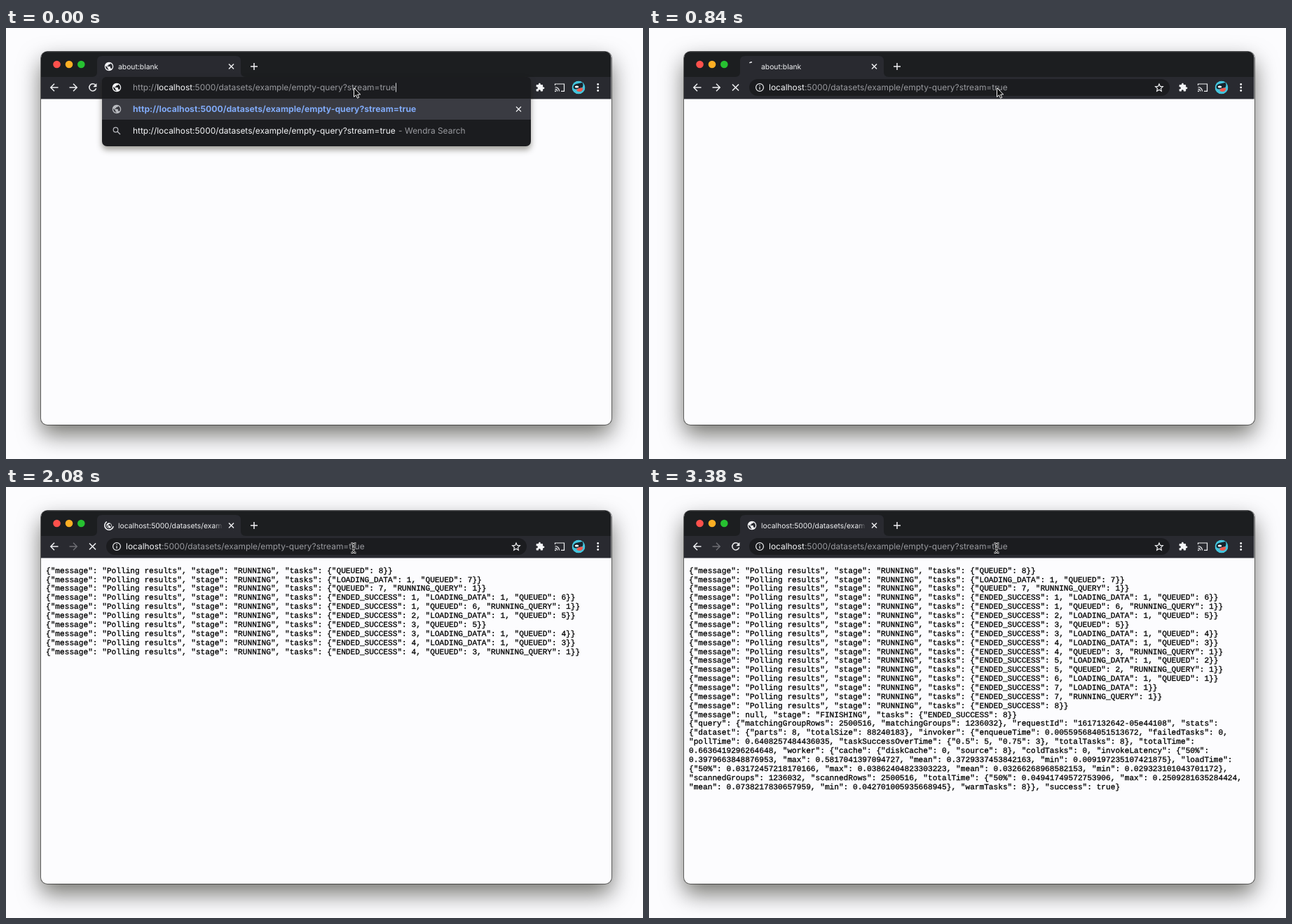
Animation of 909 by 616 pixels, one loop 3400 ms. Source, as an HTML page:

```html
<!DOCTYPE html>
<html lang="en">
<head>
<meta charset="utf-8">
<title>Streaming query</title>
<style>
  html, body { margin: 0; width: 100%; height: 100%; overflow: hidden; background: #fcfcfe; }
  .window {
    position: absolute; left: 50px; top: 33.5px; width: 813.5px; height: 533.5px; border-radius: 9px;
    background: #fcfcfe;
    box-shadow: 0 0 0 1px rgba(0, 0, 0, .5), 0 14px 32px rgba(10, 10, 0, .57);
  }
  svg { position: absolute; left: 0; top: 0; display: block; }
  text {
    font: 11.93px Inter, sans-serif; fill: #999a9f; white-space: pre;
    text-rendering: geometricPrecision;
  }
  .white { fill: #f4f5f7; }
  .tab { font-size: 10.35px; fill: #f0f1f3; }
  .hit { font-size: 12.2px; font-weight: 700; fill: #80aaf7; }
  .log text {
    font: 11.15px "Liberation Mono", monospace; fill: #000;
    stroke: #000; stroke-width: .3px;
  }
  .line { fill: none; stroke: #eff0f2; stroke-width: 1.5; }
  .thin { stroke-width: 1.2; }
  .drop { filter: drop-shadow(0 5px 4px rgba(20, 18, 0, .4)); }
</style>
</head>
<body>
<div class="window"></div>
<svg width="909" height="616" viewBox="0 0 909 616">
  <defs>
    <path id="globe" transform="scale(.62) translate(-12 -12)" d="M12 2C6.48 2 2 6.48 2 12s4.48 10 10 10 10-4.48 10-10S17.52 2 12 2zm-1 17.93c-3.95-.49-7-3.85-7-7.93 0-.62.08-1.21.21-1.79L9 15v1c0 1.1.9 2 2 2v1.93zm6.9-2.54c-.26-.81-1-1.39-1.9-1.39h-1v-3c0-.55-.45-1-1-1H8v-2h2c.55 0 1-.45 1-1V7h2c1.1 0 2-.9 2-2v-.41c2.93 1.19 5 4.06 5 7.41 0 2.08-.8 3.97-2.1 5.39z"/>
    <path id="cross" d="M-3.5-3.5l7 7M3.5-3.5l-7 7"/>
    <path id="arrow" d="M5.5 0H-5M0-5.2L-5.2 0 0 5.2"/>
    <path id="ibeam" d="M492.5 80.5q3.5 0 3.5 2.5 0-2.5 3.5-2.5M496 82.5v9M492.5 94q3.5 0 3.5-2.5 0 2.5 3.5 2.5M494 87.5h4"/>
    <clipPath id="frame"><rect x="50" y="33.5" width="813.5" height="533.5" rx="9"/></clipPath>
    <clipPath id="face"><circle cx="817" cy="85" r="9.5"/></clipPath>
    <linearGradient id="fade">
      <stop stop-color="#292a30" stop-opacity="0"/>
      <stop offset=".8" stop-color="#292a30"/>
    </linearGradient>
  </defs>

  <g clip-path="url(#frame)">
    <path fill="#1c1e20" d="M50 33h814v37H50z"/>
    <path fill="#292a30" d="M50 70h814v31.4H50z"/>
    <path fill="#292a30" d="M123 70q7 0 7-7V47q0-7 7-7H328q7 0 7 7V63q0 7 7 7z"/>
  </g>
  <path d="M58 34.5H855" stroke="#55575a" stroke-opacity=".35"/>
  <circle cx="72.5" cy="52" r="5.3" fill="#fd514c"/>
  <circle cx="90" cy="52" r="5.3" fill="#fdaf24"/>
  <circle cx="107.3" cy="52" r="5.3" fill="#27c131"/>

  <text class="tab" id="title" x="160" y="58.7"></text>
  <path fill="url(#fade)" d="M297 44h16v22h-16z"/>
  <g id="icon"><use href="#globe" class="white"/></g>
  <path id="spinner" class="line"/>
  <use href="#cross" class="line" x="321.5" y="55"/>
  <path class="line" d="M349 55h10M354 50v10"/>

  <use href="#arrow" class="line" x="69" y="85"/>
  <use href="#arrow" class="line" id="forward" transform="translate(96 85) scale(-1 1)"/>
  <g id="reload">
    <path class="line" d="M127.6 81.6A5 5 0 1 0 128.6 86.3"/>
    <path class="white" d="M129.4 79v5.2h-5.2z"/>
  </g>
  <use id="stop" href="#cross" class="line thin" transform="translate(123.5 85) scale(1.3)"/>

  <rect id="pill" x="143" y="73" width="600" height="24" rx="12" fill="#1b1c1f"/>
  <g id="popup">
    <rect id="sheet" class="drop" x="137" y="70" width="612" height="99" rx="7"/>
    <path fill="#1b1c1f" d="M137 101V77q0-7 7-7H742q7 0 7 7V101z"/>
    <path id="pick" d="M137 101h612v30H137z"/>
    <use href="#globe" x="158" y="116" fill="#b9bbc0"/>
    <text class="hit" x="181" y="120">http://localhost:5000/datasets/example/empty-query?stream=true</text>
    <use href="#cross" class="line thin" x="731.5" y="116"/>
    <g class="line thin" style="stroke:#b9bbc0">
      <circle cx="156.5" cy="145.5" r="3.3"/><path d="M159 148l4 4"/>
    </g>
    <text class="white" x="181" y="151">http://localhost:5000/datasets/example/empty-query?stream=true</text>
    <text x="560" y="151">-</text>
    <text x="569" y="151">Wendra Search</text>
  </g>

  <g id="typed">
    <use href="#globe" class="white" x="158" y="85"/>
    <text x="181" y="89.3">http://<tspan class="white">localhost</tspan>:5000/datasets/example/empty-query?stream=true</text>
    <path d="M556.5 78.5v13" stroke="#d5d6d9"/>
  </g>
  <g id="visited">
    <circle class="line thin" cx="158" cy="85" r="5.4"/>
    <path class="line thin" d="M158 84.3v3.7M158 81.7v1.4"/>
    <text x="171" y="89.3"><tspan class="white">localhost</tspan>:5000/datasets/example/empty-query?stream=true</text>
    <path class="line thin" d="M728 79.9l1.5 3.5 3.9.4-2.9 2.6.8 3.8-3.3-2-3.3 2 .8-3.8-2.9-2.6 3.9-.4z"/>
  </g>

  <path class="white" transform="translate(755.5 78.3) scale(.56)" d="M20.5 11H19V7c0-1.1-.9-2-2-2h-4V3.5C13 2.12 11.88 1 10.5 1S8 2.12 8 3.5V5H4c-1.1 0-1.99.9-1.99 2v3.8H3.5c1.49 0 2.7 1.21 2.7 2.7s-1.21 2.7-2.7 2.7H2V20c0 1.1.9 2 2 2h3.8v-1.5c0-1.49 1.21-2.7 2.7-2.7 1.49 0 2.7 1.21 2.7 2.7V22H17c1.1 0 2-.9 2-2v-4h1.5c1.38 0 2.5-1.12 2.5-2.5S21.88 11 20.5 11z"/>
  <path class="line thin" d="M783.5 82V80h13v10.3h-4.5M783.5 84.5a6 6 0 0 1 6 6M783.5 87.3a3.2 3.2 0 0 1 3.2 3.2"/>
  <circle class="white" cx="784" cy="90.3" r="1"/>
  <g clip-path="url(#face)">
    <circle cx="817" cy="85" r="9.5" fill="#43c4dc"/>
    <path d="M809.5 84q1-4 6-4.5l7-1.500q2 3 0 7l-9 2.500q-4 0-4-3.500z" fill="#17242d"/>
    <ellipse cx="814.5" cy="84" rx="2.8" ry="1.6" fill="#fff"/>
    <path d="M814 88.500q4-4 9.500-2.500-.5 5-5 5-3.500 0-4.500-2.500z" fill="#f0584d"/>
  </g>
  <g class="white">
    <circle cx="844.7" cy="80.5" r="1.4"/><circle cx="844.7" cy="85" r="1.4"/><circle cx="844.7" cy="89.5" r="1.4"/>
  </g>

  <g class="log" id="log"></g>

  <path id="pointer" d="M496.5 85.5v13l3-2.7 2 4.5 2.2-1-2-4.3h4z" fill="#111" stroke="#f4f4f4"/>
  <g id="beam" fill="none">
    <use href="#ibeam" stroke="#f4f4f4" stroke-width="2.6"/>
    <use href="#ibeam" stroke="#111"/>
  </g>
</svg>
<script>
const LOOP = 3400, SUBMIT = 680, CLOSE = 740, COMMIT = 1060, DONE = 2680;
const $ = id => document.getElementById(id);
const show = (id, on) => { $(id).style.display = on ? '' : 'none'; };

// One digit per task state, in the order of STATES.
const STATES = ['ENDED_SUCCESS', 'LOADING_DATA', 'QUEUED', 'RUNNING_QUERY'];
const POLLS = '0080 0170 0071 1160 1061 2150 3050 3140 4130 4031 5120 5021 6110 7100 7001 8000';
const poll = counts => {
  const tasks = STATES.map((name, i) => +counts[i] && `"${name}": ${counts[i]}`).filter(Boolean);
  return `{"message": "Polling results", "stage": "RUNNING", "tasks": {${tasks.join(', ')}}}`;
};
const RESULT = `{"query": {"matchingGroupRows": 2500516, "matchingGroups": 1236032}, "requestId": "1617132642-05e44108", "stats":
{"dataset": {"parts": 8, "totalSize": 88240183}, "invoker": {"enqueueTime": 0.005595684051513672, "failedTasks": 0,
"pollTime": 0.6408257484436035, "taskSuccessOverTime": {"0.5": 5, "0.75": 3}, "totalTasks": 8}, "totalTime":
0.6636419296264648, "worker": {"cache": {"diskCache": 0, "source": 8}, "coldTasks": 0, "invokeLatency": {"50%":
0.3979663848876953, "max": 0.5817041397094727, "mean": 0.3729337453842163, "min": 0.009197235107421875}, "loadTime":
{"50%": 0.03172457218170166, "max": 0.03862404823303223, "mean": 0.03266268968582153, "min": 0.029323101043701172},
"scannedGroups": 1236032, "scannedRows": 2500516, "totalTime": {"50%": 0.04941749572753906, "max": 0.2509281635284424,
"mean": 0.0738217830657959, "min": 0.042701005935668945}, "warmTasks": 8}}, "success": true}`;

const messages = POLLS.split(' ').map(poll);
messages.push('{"message": null, "stage": "FINISHING", "tasks": {"ENDED_SUCCESS": 8}}');
const arrival = i =>
  i >= messages.length ? DONE : i < 10 ? 1160 + 100 * i : 2060 + 63 * (i - 9);

const rows = [...messages, ...RESULT.split('\n')].map((line, i) => {
  const el = document.createElementNS('http://www.w3.org/2000/svg', 'text');
  el.setAttribute('x', 57);
  el.setAttribute('y', 122.7 + 12.87 * i);
  el.textContent = line;
  $('log').append(el);
  return { el, at: arrival(i) };
});

// Time, start angle and sweep, clockwise from the top.
const SPIN = [
  [SUBMIT, -6, 6], [COMMIT, -76, 76], [1380, 0, 200],
  [2080, 100, 230], [2540, 125, 270], [DONE, 165, 255]
];
function arc(t) {
  const i = Math.max(1, SPIN.findIndex(k => t <= k[0]));
  const [a, b] = [SPIN[i - 1], SPIN[i]];
  const p = (t - a[0]) / (b[0] - a[0]);
  const from = a[1] + (b[1] - a[1]) * p, sweep = a[2] + (b[2] - a[2]) * p;
  const point = deg => {
    const r = deg * Math.PI / 180;
    return `${(147 + 6.2 * Math.sin(r)).toFixed(2)} ${(55 - 6.2 * Math.cos(r)).toFixed(2)}`;
  };
  return `M${point(from)}A6.2 6.2 0 ${sweep > 180 ? 1 : 0} 1 ${point(from + sweep)}`;
}

// The picture advances three times every 140 ms.
function snap(t) {
  const r = t % 140;
  return t - r + (r < 20 ? 0 : r < 120 ? 20 : 120);
}

function draw(t) {
  const sent = t >= SUBMIT, loaded = t >= COMMIT, busy = sent && t < DONE;
  show('popup', t < CLOSE);
  show('typed', !sent);
  show('visited', sent);
  show('pill', sent);
  show('reload', !busy);
  show('stop', busy);
  show('spinner', busy);
  show('icon', !busy || loaded);
  show('pointer', !loaded);
  show('beam', loaded);
  $('sheet').setAttribute('fill', sent ? '#37383f' : '#1b1c1f');
  $('pick').setAttribute('fill', sent ? '#535358' : '#3a3b42');
  $('forward').style.stroke = loaded ? '#6d6e73' : '';
  $('title').textContent = loaded ? 'localhost:5000/datasets/exam' : 'about:blank';
  $('icon').setAttribute('transform', `translate(147 55) scale(${busy ? .62 : 1})`);
  if (busy) $('spinner').setAttribute('d', arc(t));
  for (const row of rows) row.el.style.display = t >= row.at ? '' : 'none';
}

const start = performance.now();
function tick() {
  draw(snap((performance.now() - start) % LOOP));
  requestAnimationFrame(tick);
}
tick();
</script>
</body>
</html>
```
